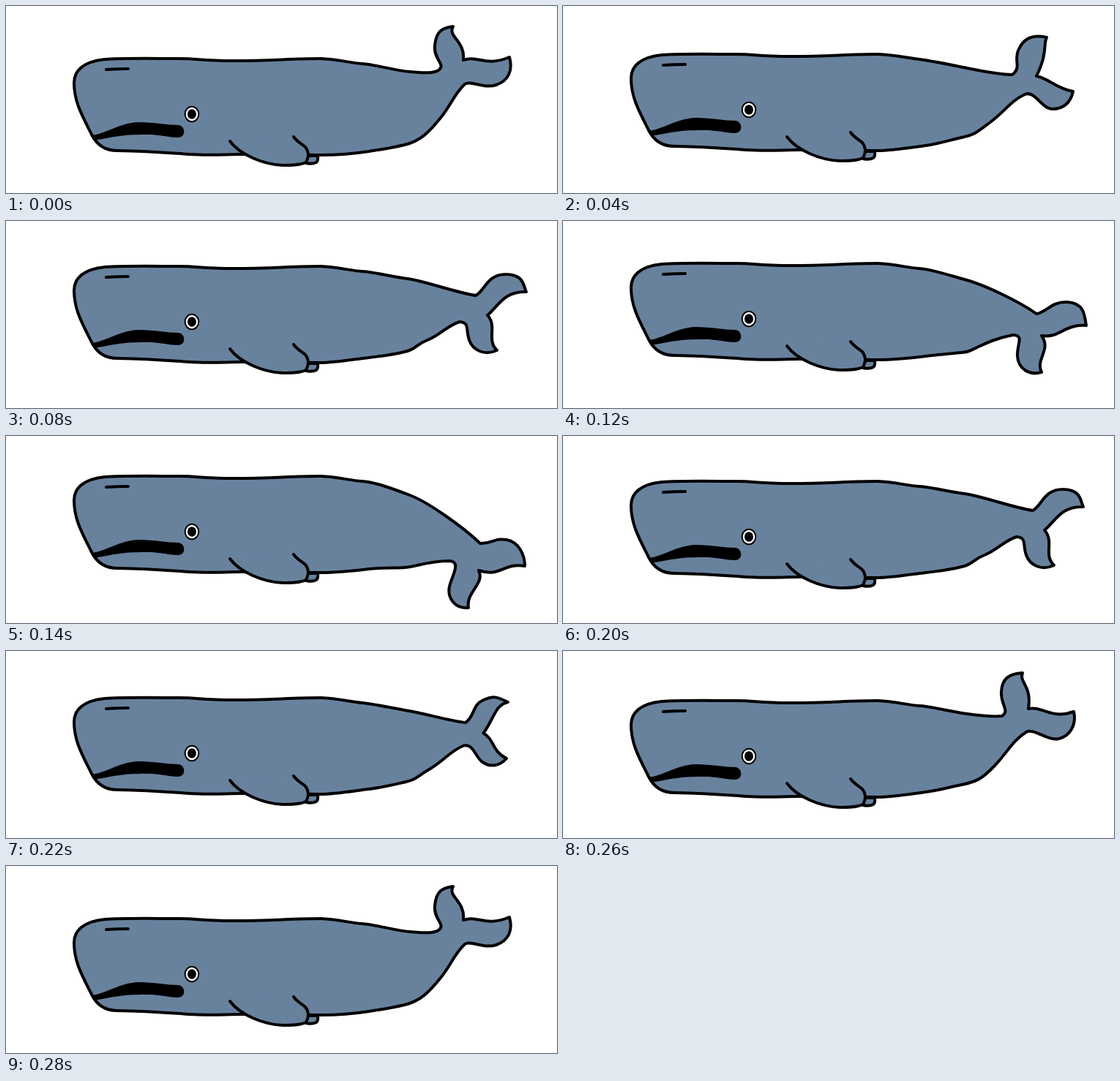
Write an HTML page without scripts that moves like this. It is 753x256 px and loops after 300 ms.

```html
<!DOCTYPE html>
<html lang="en">
<head>
<meta charset="utf-8">
<title>Swimming whale</title>
<style>
  html, body { margin: 0; width: 100%; height: 100%; overflow: hidden; background: #fff; }
  svg { display: block; width: 753px; height: 256px; }
  .skin { fill: #68829e; }
  .skin, .line { stroke: #000; stroke-width: 4; stroke-linecap: round; stroke-linejoin: round; }
  .line { fill: none; }

  /* Tail poses, from fully raised to fully lowered */
  .tail {
    --raised: path("M430,72 C455,73 470,78 487,79 S530,88 552,90 S584,92 591,88 C602,80 584,74 586,54 S596,30 611,28 C603,42 628,48 625,74 C645,67 655,84 688,70 C693,88 687,102 670,108 S635,101 627,107 C612,121 610,133 594,153 S566,185 545,190 S515,196 496,199 S450,204 430,204");
    --high: path("M430,68 C455,69 470,74 487,75 S530,83 552,86 S590,90 600,89 C611,82 598,74 599,56 S609,31 628,30 C623,44 641,46 636,79 C655,75 668,94 698,83 C702,101 693,116 678,120 S643,105 633,111 C614,123 608,138 590,157 S564,179 545,183 S512,191 496,193 S450,200 430,200");
    --middle: path("M430,66 C455,67 470,71 487,73 S532,81 552,85 S600,94 614,94 C627,84 616,75 622,61 S638,38 661,43 C656,52 663,64 647,96 C664,99 672,112 697,117 C694,132 684,141 669,141 S645,115 631,121 C612,130 604,144 584,159 S563,176 545,180 S512,189 496,191 S450,198 430,198");
    --level: path("M430,62 C455,63 470,68 487,69 S526,76 549,79 S615,98 642,102 C655,95 657,73 683,73 S707,90 711,97 C681,96 674,115 658,129 C672,144 656,163 671,177 C654,185 638,177 633,163 S634,139 620,138 C603,143 594,156 576,163 S562,175 545,179 S515,185 496,187 S450,194 430,194");
    --low: path("M430,58 C455,59 470,64 487,65 S530,75 552,81 S622,109 647,127 C661,125 667,110 689,111 S713,127 715,143 C684,141 679,161 654,157 C668,176 645,190 654,207 C637,212 622,202 621,185 S631,157 615,156 C594,160 581,166 568,172 S555,179 545,180 S512,183 496,185 S450,190 430,190");
    --lowered: path("M430,55 C455,56 470,61 487,62 S528,72 552,81 S624,124 648,147 C664,148 667,139 684,142 S709,163 709,178 C680,173 676,194 646,184 C655,202 628,214 632,235 C612,237 603,220 606,206 S623,172 606,171 C588,171 575,174 562,177 S553,179 545,180 S512,180 496,182 S450,187 430,187");
    d: var(--raised);
    animation: flap 300ms steps(1) infinite;
  }
  .front { animation: bob 300ms steps(1) infinite; }

  @keyframes flap {
    0%, 93.33%, 100% { d: var(--raised); }
    6.66%, 86.66% { d: var(--high); }
    13.33% { d: var(--middle); animation-timing-function: steps(2); }
    26.66% { d: var(--level); animation-timing-function: steps(2); }
    39.99% { d: var(--low); }
    46.66% { d: var(--lowered); }
    53.33% { d: var(--low); animation-timing-function: steps(2); }
    66.66% { d: var(--level); animation-timing-function: steps(2); }
    79.99% { d: var(--middle); }
  }
  @keyframes bob {
    0%, 93.33%, 100% { transform: translateY(0); }
    6.66%, 86.66% { transform: translateY(-4px); }
    13.33% { transform: translateY(-6px); animation-timing-function: steps(2); }
    26.66% { transform: translateY(-10px); animation-timing-function: steps(2); }
    39.99% { transform: translateY(-14px); }
    46.66% { transform: translateY(-17px); }
    53.33% { transform: translateY(-14px); animation-timing-function: steps(2); }
    66.66% { transform: translateY(-10px); animation-timing-function: steps(2); }
    79.99% { transform: translateY(-6px); }
  }
</style>
</head>
<body>
<svg viewBox="0 0 753 256">
  <path class="skin tail"/>
  <g class="front">
    <path class="skin" d="M430,72 C390,72 360,75 312,75 S265,72 237,72 S160,71 135,73 C105,76 93,89 93,105 C93,131 104,150 117,176 C124,190 136,198 152,198 C200,199 220,201 250,203 S300,203 322,203 L430,204"/>
    <path class="skin" d="M411,205 L426,205 Q427,212 424,214 Q419,217 410,215"/>
    <path class="skin" d="M306,185 C320,204 352,217 378,218 C390,218 402,218 410,214 C414,207 414,199 409,193 C403,188 398,186 393,179"/>
    <path class="line" d="M137,87 Q152,86 167,86"/>
    <path d="M118,177 C138,174 156,160 181,159 C202,159 220,163 236,163 C246,165 246,180 235,180 C221,180 214,176 190,176 C158,176 148,179 121,184 Z"/>
    <ellipse cx="254" cy="148" rx="9.3" ry="10.3" fill="#fff" stroke="#000" stroke-width="2"/>
    <ellipse cx="254" cy="148" rx="6" ry="6.7"/>
  </g>
</svg>
</body>
</html>
```
